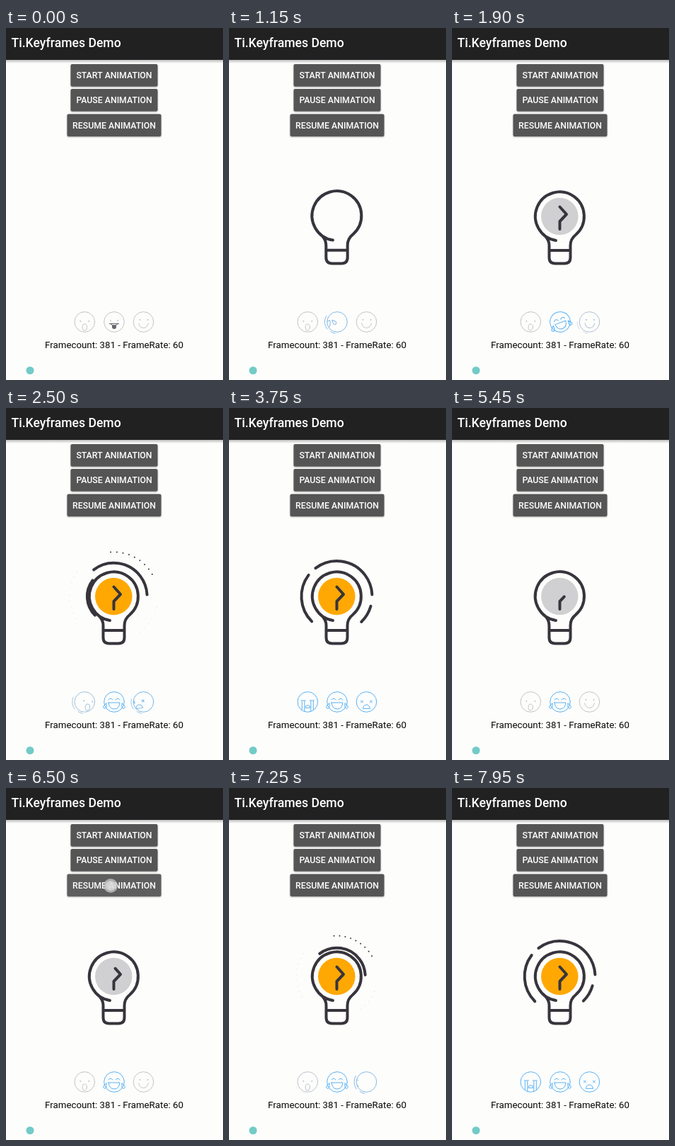
Write an HTML page with a canvas that moves like this. It is 307 by 497 pixels and loops after 8000 ms.

```html
<!DOCTYPE html>
<html lang="en">
<head>
<meta charset="utf-8">
<title>Ti.Keyframes Demo</title>
<style>
html, body { margin: 0; width: 100%; height: 100%; overflow: hidden; background: #fdfdfc; }
canvas { display: block; width: 307px; height: 497px; }
</style>
</head>
<body>
<canvas></canvas>
<script>
const W = 307, H = 497, LOOP = 8000;
const PAPER = '#fdfdfc', INK = '#38343c';
const GREY = [196, 196, 200], BLUE = [88, 178, 246];
const UNLIT = [208, 208, 210], LIT = [255, 168, 4];
const canvas = document.querySelector('canvas');
const ctx = canvas.getContext('2d');
const dpr = window.devicePixelRatio || 1;
canvas.width = W * dpr;
canvas.height = H * dpr;

const BUTTONS = [
  { label: 'START ANIMATION', x: 91.5, y: 51, w: 123 },
  { label: 'PAUSE ANIMATION', x: 91.5, y: 86, w: 123 },
  { label: 'RESUME ANIMATION', x: 86.5, y: 121.5, w: 133 }
];
const TAPS = [
  { at: 550, button: 0, x: 150, y: 54 },
  { at: 4450, button: 0, x: 150, y: 54 },
  { at: 5500, button: 1, x: 150, y: 89 },
  { at: 6500, button: 2, x: 148, y: 138 }
];

const rad = deg => deg * Math.PI / 180;
const ramp = (t, from, to) => Math.min(1, Math.max(0, (t - from) / (to - from)));
const easeOut = k => 1 - (1 - k) ** 3;
const easeInOut = k => k * k * (3 - 2 * k);
const backOut = k => 1 + 2.1 * (k - 1) ** 3 + 1.1 * (k - 1) ** 2;
const blend = (a, b, k) => `rgb(${a.map((v, i) => Math.round(v + (b[i] - v) * k))})`;

// Position inside the drawn animation: started, restarted, paused, resumed.
function playhead(t) {
  if (t < 650) return 0;
  if (t < 4550) return t - 650;
  if (t < 5600) return t - 4550;
  return Math.max(1050, t - 5600);
}

function text(str, x, y, size, weight, color, align = 'left') {
  ctx.font = `${weight} ${size}px Roboto, sans-serif`;
  ctx.textAlign = align;
  ctx.fillStyle = color;
  ctx.fillText(str, x, y);
}

function disc(x, y, r, color) {
  ctx.fillStyle = color;
  ctx.beginPath();
  ctx.arc(x, y, r, 0, 2 * Math.PI);
  ctx.fill();
}

function strokeArc(x, y, r, from, to) {
  ctx.beginPath();
  ctx.arc(x, y, r, rad(from), rad(to));
  ctx.stroke();
}

const strokePath = d => ctx.stroke(new Path2D(d));

function drawScreen(t) {
  ctx.fillStyle = PAPER;
  ctx.fillRect(0, 0, W, H);
  const shadow = ctx.createLinearGradient(0, 45, 0, 50);
  shadow.addColorStop(0, '#bcbcbc');
  shadow.addColorStop(1, PAPER);
  ctx.fillStyle = shadow;
  ctx.fillRect(0, 45, W, 5);
  ctx.fillStyle = '#212121';
  ctx.fillRect(0, 0, W, 45);
  text('Ti.Keyframes Demo', 7.5, 27, 17.6, 500, '#fff');

  BUTTONS.forEach((b, i) => {
    const glow = Math.max(0, ...TAPS.filter(p => p.button === i && t >= p.at)
      .map(p => 1 - ramp(t, p.at + 150, p.at + 500)));
    ctx.save();
    ctx.shadowColor = 'rgba(0,0,0,.4)';
    ctx.shadowBlur = 2 * dpr;
    ctx.shadowOffsetY = dpr;
    ctx.fillStyle = '#555';
    ctx.beginPath();
    ctx.roundRect(b.x, b.y, b.w, 31.5, 2);
    ctx.fill();
    ctx.restore();
    ctx.fillStyle = `rgba(200,200,200,${0.08 * glow})`;
    ctx.fill();
    text(b.label, b.x + b.w / 2, b.y + 20.3, 12.3, 500, '#fff', 'center');
  });

  text('Framecount: 381 - FrameRate: 60', 153, 452, 13.3, 400, '#060606', 'center');
  disc(34, 483.5, 5.5, '#72cbc6');
}

function drawTouch(t) {
  for (const p of TAPS) {
    if (t < p.at || t >= p.at + 150) continue;
    disc(p.x, p.y, 10, 'rgba(200,200,200,.75)');
    disc(p.x, p.y, 7, 'rgba(232,232,232,.6)');
  }
}

function drawDots(s) {
  if (s < 1600 || s > 2250) return;
  const r = 52 + 10.7 * easeOut(ramp(s, 1600, 1850));
  const size = 1 - ramp(s, 1950, 2250);
  const group = (from, to, radius, color) => {
    for (let a = from; a <= to; a += 8)
      disc(152.5 + r * Math.cos(rad(a)), 266 + r * Math.sin(rad(a)), radius * size, color);
  };
  group(-94, -28, 1, INK);
  group(150, 214, 0.6, '#dcdcdc');
  group(14, 54, 0.6, '#dcdcdc');
}

function drawBulb(s) {
  const grow = backOut(ramp(s, 50, 950));
  if (s <= 50 || grow <= 0) return;
  drawDots(s);
  ctx.strokeStyle = INK;
  ctx.lineCap = ctx.lineJoin = 'round';
  ctx.lineWidth = 4;

  const rings = [[1550, -127, -3], [1800, 135, 217], [2000, 16, 46]];
  for (const [start, from, to] of rings) {
    if (s < start) continue;
    const k = easeOut(ramp(s, start, start + 700));
    strokeArc(152.5, 266, 34.5 + 15.5 * k, from, to);
  }

  ctx.save();
  ctx.translate(152.5, 334);
  ctx.scale(grow, grow);
  ctx.translate(-152.5, -334);
  disc(152.5, 266, 34.5, PAPER);
  strokePath('M147 300A34.5 34.5 0 1 1 175 292Q167.5 298 167.5 307V324Q167.5 332.5 159 332.5H146Q137.5 332.5 137.5 324V307Q137.5 299 131 293M137.5 314H167.5');
  ctx.restore();

  const fill = easeOut(ramp(s, 650, 950));
  if (fill) disc(152.3, 266, 26.3 * fill, blend(UNLIT, LIT, ramp(s, 1400, 1650)));

  const trim = easeInOut(ramp(s, 650, 1150));
  if (trim) {
    ctx.setLineDash([40 * trim, 60]);
    strokePath('M152.5 284V273L162 263L152.5 252.5');
    ctx.setLineDash([]);
  }
}

// Expressions, drawn around the centre of the face.
const EXPRESSIONS = {
  shocked() {
    disc(-6, -1, 1, ctx.strokeStyle);
    disc(6, -1, 1, ctx.strokeStyle);
    ctx.beginPath();
    ctx.ellipse(0, 7.5, 3.2, 4.5, 0, 0, 2 * Math.PI);
    ctx.stroke();
  },
  tongue() {
    disc(-5, -2, 1, ctx.strokeStyle);
    disc(5, -2, 1, ctx.strokeStyle);
    ctx.save();
    ctx.strokeStyle = ctx.fillStyle = '#66666c';
    strokePath('M-7 2.5H7M-5 3Q0 7 5 3');
    ctx.fill(new Path2D('M-3 4.5H3V7Q3 10 0 10T-3 7Z'));
    ctx.restore();
  },
  smile() {
    disc(-5, -3, 1, ctx.strokeStyle);
    disc(6, -3, 1, ctx.strokeStyle);
    strokePath('M-7 2Q-5 8.5 0 8.5T7 2');
  },
  crying() {
    strokePath('M-9-2H-3M3-2H9M-8-1V11M-4.5-1V13M4.5-1V13M8-1V11M-3 8V6Q0 3 3 6V8Z');
  },
  laughing() {
    strokePath('M-8-3Q-5-7-2-3M2-3Q5-7 8-3M-8 1H8Q7 10 0 10T-8 1Z');
    strokePath('M-11 2Q-18 7-14 9T-11 2M11 2Q18 7 14 9T11 2');
  },
  dizzy() {
    strokePath('M-8-2l3 3m0-3l-3 3M5-2l3 3m0-3l-3 3M-5 9Q-4 4 0 4T5 9Z');
  }
};

const FACES = [
  { x: 111.3, before: 'shocked', after: 'crying', from: 1600, to: 2350 },
  { x: 153, before: 'tongue', after: 'laughing', from: 50, to: 850 },
  { x: 194.5, before: 'smile', after: 'dizzy', from: 1050, to: 2150 }
];

// The old expression slides out to the right, the new one in from the left.
function drawFace(face, s) {
  const k = ramp(s, face.from, face.to);
  const turned = k >= 0.5;
  const slide = turned ? -((2 - 2 * k) ** 2) : (2 * k) ** 4;
  const wobble = face.after === 'laughing' ? -20 * Math.sin(Math.PI * ramp(s, 1050, 1500)) : 0;
  ctx.save();
  ctx.translate(face.x, 415);
  ctx.rotate(rad(wobble));
  ctx.lineWidth = 1;
  ctx.strokeStyle = blend(GREY, BLUE, k);
  strokeArc(0, 0, 14.3, 0, 360);

  if (k > 0 && k < 1) {
    ctx.save();
    ctx.globalAlpha = Math.sin(Math.PI * k);
    strokeArc(0, 0, 17.5, 145, 145 + 65 * Math.sin(Math.PI * k));
    strokeArc(0, 0, 16.5, 100, 125);
    ctx.restore();
    ctx.beginPath();
    ctx.arc(0, 0, 14.3, 0, 2 * Math.PI);
    ctx.clip();
  }
  ctx.translate(24 * slide, 0);
  ctx.rotate(rad(30 * slide));
  EXPRESSIONS[turned ? face.after : face.before]();
  ctx.restore();
}

function draw(t) {
  const s = playhead(t);
  ctx.setTransform(dpr, 0, 0, dpr, 0, 0);
  drawScreen(t);
  drawBulb(s);
  FACES.forEach(face => drawFace(face, s));
  drawTouch(t);
}

const start = performance.now();
function frame() {
  draw((performance.now() - start) % LOOP);
  requestAnimationFrame(frame);
}
frame();
</script>
</body>
</html>
```
